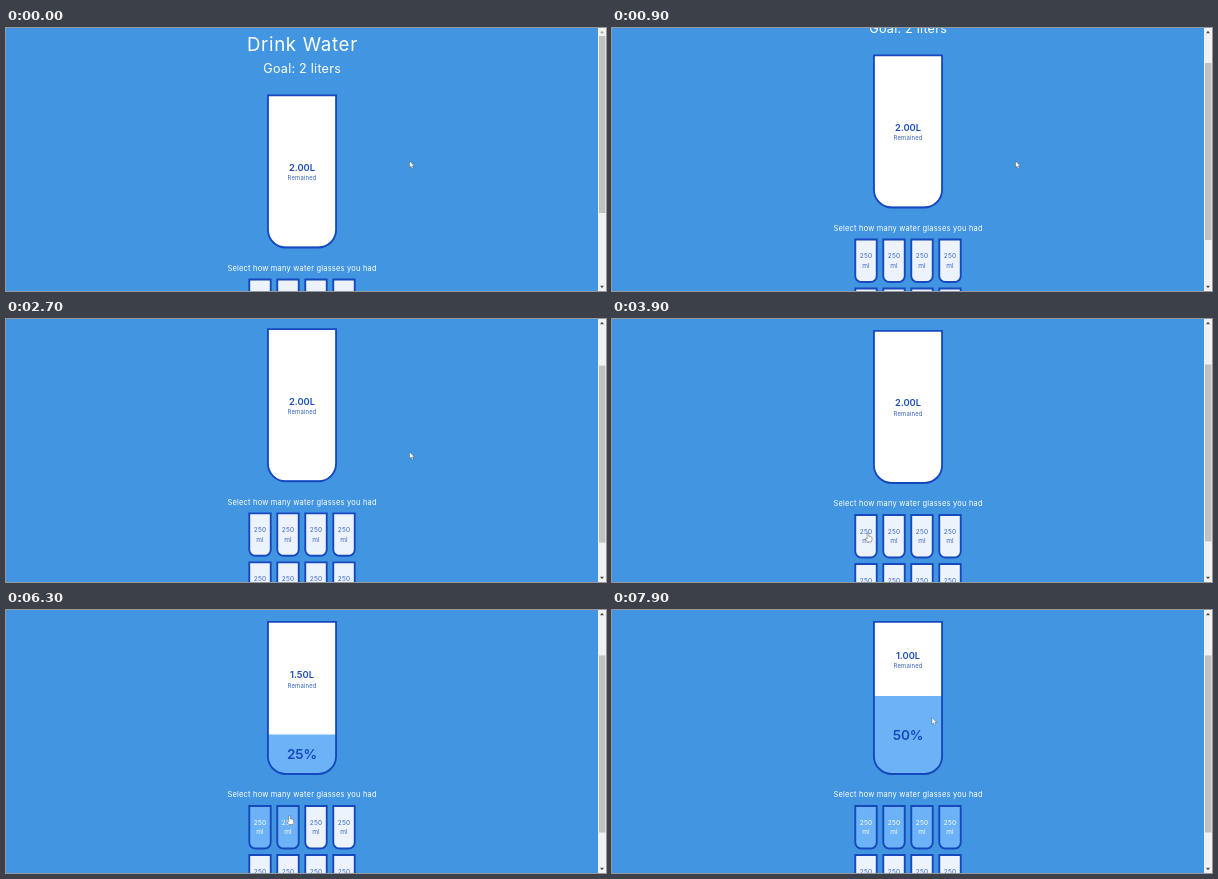
These frames come from a looping animation (600 by 263 pixels, 8 s). An HTML page:

```html
<!DOCTYPE html>
<html lang="en">
<head>
<meta charset="utf-8">
<title>Drink Water</title>
<style>
  html, body { margin: 0; width: 100%; height: 100%; overflow: hidden; background: #4295e1; }
  svg { display: block; width: 100vw; height: 100vh; }
  text { font-family: Inter, "Open Sans", sans-serif; text-anchor: middle; fill: #fff; }
  .title { font-size: 18.67px; letter-spacing: .68px; }
  .goal { font-size: 12.6px; letter-spacing: .24px; }
  .lead { font-size: 7.47px; letter-spacing: .21px; }
  .left { font-size: 9.33px; font-weight: 600; fill: #1c4db8; }
  .note { font-size: 5.9px; letter-spacing: .18px; fill: #3763c4; }
  .pct { font-size: 13.6px; font-weight: 600; letter-spacing: -.1px; fill: #1549bd; }
  .size { font-size: 6.53px; letter-spacing: .12px; }
  .edge { fill: none; stroke: #1549bd; stroke-width: 1.87px; }
</style>
</head>
<body>
<svg id="stage" viewBox="0 0 600 263" preserveAspectRatio="none">
  <defs><clipPath id="glass"><path id="glassClip"/></clipPath></defs>
  <rect width="600" height="263" fill="#4295e1"/>
  <g id="page">
    <text class="title" x="296.4" y="22.6">Drink Water</text>
    <text class="goal" x="296.2" y="44.6">Goal: 2 liters</text>
    <path id="glassBody" fill="#fff"/>
    <g clip-path="url(#glass)">
      <rect id="water" x="261" width="70" fill="#6cb2f6"/>
      <text id="pct" class="pct" x="296"></text>
    </g>
    <text id="left" class="left" x="296"></text>
    <text id="note" class="note" x="296.1">Remained</text>
    <path id="glassEdge" class="edge"/>
    <text class="lead" x="296.1" y="242.8">Select how many water glasses you had</text>
    <g id="cups"></g>
  </g>
  <rect x="592" width="8" height="263" fill="#f1f1f1"/>
  <rect id="thumb" x="593" width="6.5" height="177" fill="#c1c0c3"/>
  <path id="up" d="M594 5.2L596 2.8L598 5.2Z"/>
  <path d="M594 257.8L596 260.2L598 257.8Z" fill="#505050"/>
  <path id="arrow" d="M0 0V6.6L1.5 5.3L2.6 7.8L3.8 7.3L2.7 4.9H4.7Z"
    fill="#fff" stroke="#333" stroke-width=".35"/>
  <path id="hand" d="M-.8 .6Q0 -.5 .8 .6V3.2L3.4 3.9Q4.3 4.2 4.1 5.2L3.5 8.9H-.6L-2.7 5.9Q-2.6 4.6 -.8 6Z"
    fill="#fff" stroke="#444" stroke-width=".45"/>
</svg>
<script>
const LOOP = 8000, STEP = 100, FADE = 300;
const CENTER = 296, TOP = 66.4, BOTTOM = 218.5, CUPS_TOP = 250.6;
const $ = id => document.getElementById(id);

// time, scroll offset
const SCROLL = [
  [200, 0], [300, 3], [500, 12], [700, 24], [900, 40], [1000, 60], [1100, 82],
  [1700, 82], [1800, 78], [2300, 61], [2500, 61], [2600, 59], [2700, 57.2], [3000, 55.5]
].map(([t, y], i, a) => i && a[i - 1][0] === t ? a[i - 1] : [t, y]);

// time, pointer x, pointer y
const POINTER = [
  [3100, 403.6, 133], [3200, 396, 138], [3500, 322, 180], [3700, 272, 209],
  [3900, 256, 214], [4200, 256, 214], [4700, 260, 218], [5000, 260, 218],
  [5200, 280, 210], [5300, 280, 210], [5400, 283.5, 205.6], [6300, 283.5, 205.6],
  [6800, 338, 212], [7200, 338, 212], [7500, 334, 160], [7800, 322, 111], [7900, 320, 107.6]
];

// time, cups filled after the click
const CLICKS = [[4000, 1], [5400, 2], [7000, 4]];

function track(keys, t) {
  const i = keys.findIndex(k => k[0] > t);
  if (i === 0) return keys[0].slice(1);
  if (i < 0) return keys[keys.length - 1].slice(1);
  const a = keys[i - 1], b = keys[i], p = (t - a[0]) / (b[0] - a[0]);
  return a.slice(1).map((v, n) => v + (b[n + 1] - v) * p);
}

// cubic-bezier(.25, .1, .25, 1)
function ease(x) {
  if (x <= 0) return 0;
  if (x >= 1) return 1;
  const curve = (s, a, b) => 3 * s * (1 - s) * (1 - s) * a + 3 * s * s * (1 - s) * b + s ** 3;
  let lo = 0, hi = 1;
  for (let i = 0; i < 20; i++) {
    const mid = (lo + hi) / 2;
    if (curve(mid, .25, .25) < x) lo = mid; else hi = mid;
  }
  return curve(lo, .1, 1);
}

const mix = (a, b, p) => `rgb(${a.map((v, i) => Math.round(v + (b[i] - v) * p))})`;

function cupPath(cx, top, w, h, r) {
  const b = .93, x = cx - w / 2 + b, y = top + b, iw = w - 2 * b, ih = h - 2 * b, q = r - b;
  return `M${x} ${y}h${iw}v${ih - q}a${q} ${q} 0 0 1 ${-q} ${q}h${2 * q - iw}a${q} ${q} 0 0 1 ${-q} ${-q}Z`;
}

function add(tag, attrs, text = "") {
  const el = document.createElementNS("http://www.w3.org/2000/svg", tag);
  for (const k in attrs) el.setAttribute(k, attrs[k]);
  el.textContent = text;
  return $("cups").appendChild(el);
}

const big = cupPath(CENTER, TOP, 70, 154, 18.67);
["glassClip", "glassBody", "glassEdge"].forEach(id => $(id).setAttribute("d", big));

const cups = Array.from({ length: 8 }, (_, i) => {
  const x = 254 + (i % 4) * 28, y = CUPS_TOP + Math.floor(i / 4) * 49;
  const d = cupPath(x, y, 23.33, 44.33, 7);
  const body = add("path", { d });
  add("path", { d, class: "edge" });
  const labels = [
    add("text", { class: "size", x, y: y + 19.5 }, "250"),
    add("text", { class: "size", x, y: y + 29.2 }, "ml")
  ];
  const click = CLICKS.find(c => i < c[1]);
  return { x, y, body, labels, at: click ? click[0] : Infinity };
});

function draw(t) {
  const [scroll] = track(SCROLL, t);
  $("page").setAttribute("transform", `translate(0 ${-scroll})`);
  $("thumb").setAttribute("y", 8 + scroll * .675);
  $("up").setAttribute("fill", scroll ? "#505050" : "#a3a3a3");

  let count = 0, level = 0;
  for (const [at, n] of CLICKS) {
    if (t < at) break;
    level += (n - count) * ease((t - at) / FADE);
    count = n;
  }
  const h = level / 8 * 154, middle = (TOP + 1.87 + BOTTOM - h) / 2;
  $("water").setAttribute("y", BOTTOM - h);
  $("water").setAttribute("height", h + 2);
  $("pct").textContent = count ? count * 12.5 + "%" : "";
  $("pct").setAttribute("y", BOTTOM - h / 2 + 5.5);
  $("left").textContent = (2 - count * .25).toFixed(2) + "L";
  $("left").setAttribute("y", middle - .6);
  $("note").setAttribute("y", middle + 9.1);

  for (const c of cups) {
    const p = ease((t - c.at) / FADE);
    c.body.setAttribute("fill", mix([236, 243, 252], [108, 178, 246], p));
    c.labels.forEach(l => l.style.fill = mix([62, 104, 196], [255, 255, 255], p));
  }

  const [x, y] = track(POINTER, t);
  const over = cups.some(c => Math.abs(x - c.x) < 11.7 && y + scroll > c.y && y + scroll < c.y + 44.3);
  for (const id of ["arrow", "hand"]) {
    $(id).setAttribute("transform", `translate(${x} ${y})`);
    $(id).setAttribute("visibility", (id === "hand") === over ? "visible" : "hidden");
  }
}

const start = performance.now();
function tick() {
  const t = Math.max(0, performance.now() - start) % LOOP;
  draw(Math.floor(t / STEP) * STEP);
  requestAnimationFrame(tick);
}
tick();
</script>
</body>
</html>
```
